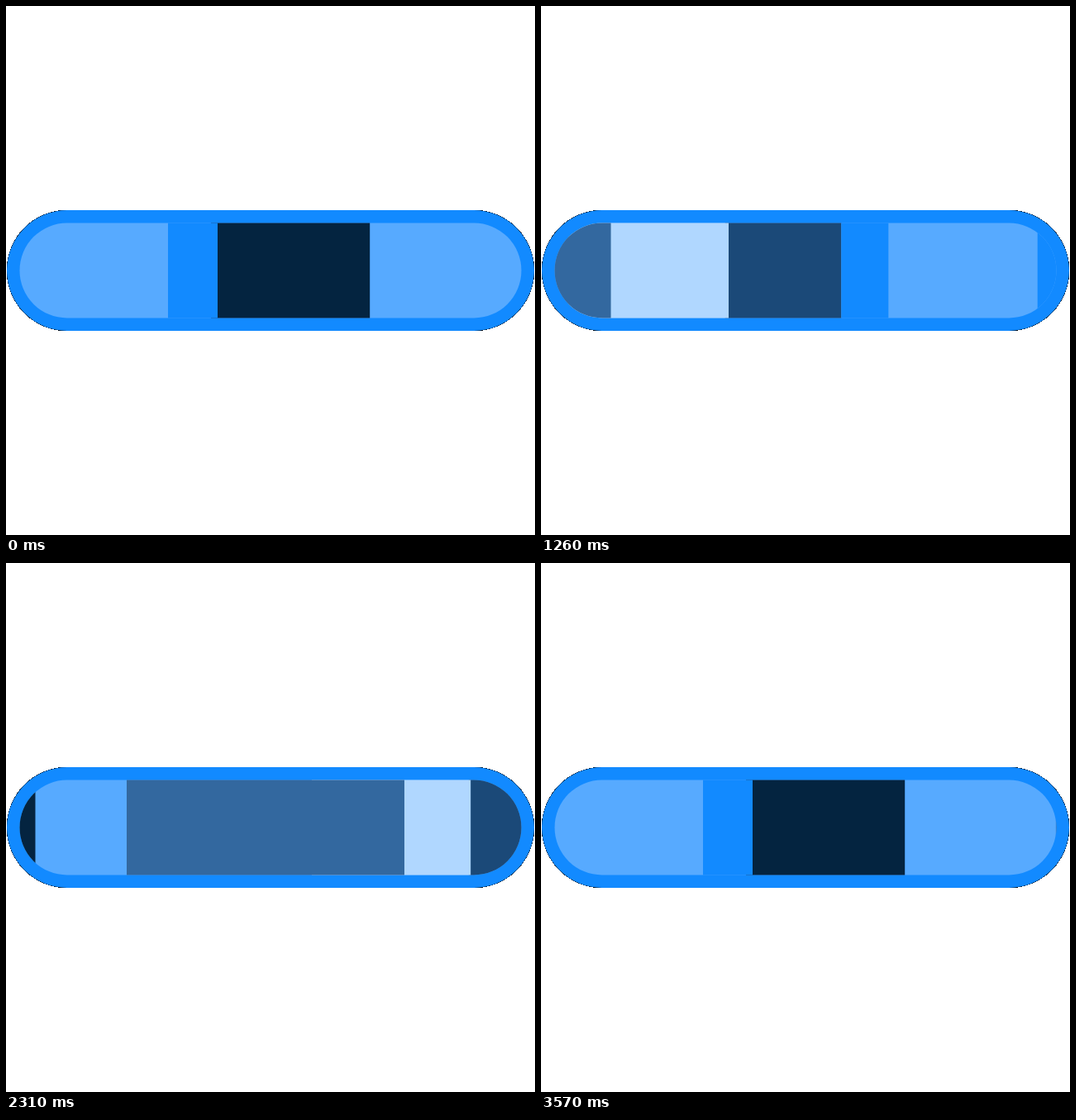
Recreate the animation shown at these times as an HTML page. Size 640 px wide and 640 px high, loop 3600 ms.

```html
<!DOCTYPE html>
<html lang="en">
<head>
<meta charset="utf-8">
<title>Sliding blocks</title>
<style>
  html, body { margin: 0; width: 100%; height: 100%; overflow: hidden; background: #fff; }
  svg { display: block; width: 100vw; height: 100vh; }
</style>
</head>
<body>
<svg viewBox="0 0 640 640">
  <defs>
    <clipPath id="pill"><rect x="16.5" y="262.5" width="607" height="115" rx="57.5"/></clipPath>
  </defs>
  <rect x="0.6" y="246.6" width="638.8" height="146.8" rx="73.4" shape-rendering="crispEdges"/>
  <rect x="1" y="247" width="638" height="146" rx="73" fill="#128aff"/>
  <rect x="16.5" y="262.5" width="607" height="115" rx="57.5" fill="#57aaff"/>
  <g id="blocks"></g>
</svg>
<script>
const LOOP = 3600, STEP = 30;
const SLOW = 0.3212, FAST = 0.3785;
const SPAN = SLOW * (LOOP - STEP);
const BLUE = '#128aff';

// An edge passes x at time t0, moving right at a steady speed.
const edge = (x, t0 = 0, v = SLOW) => t => x + v * (t - t0);

// Later blocks cover earlier ones.
const blocks = [
  ['#042440', edge(248), edge(440.2)],
  [BLUE, edge(196), edge(256)],
  ['#1b4978', edge(-182), edge(-41.4)],
  ['#b0d7ff', edge(-372), edge(227, 1260, 0.3192)],
  [BLUE, edge(-41.4), edge(15.6)],
  ['#33689f', edge(146, 2310, FAST), edge(323, 1890, FAST)]
];

const group = document.getElementById('blocks');

function addBlock([fill, left, right], shift) {
  const holder = document.createElementNS('http://www.w3.org/2000/svg', 'g');
  const rect = document.createElementNS('http://www.w3.org/2000/svg', 'rect');
  holder.setAttribute('clip-path', 'url(#pill)');
  rect.setAttribute('y', 250);
  rect.setAttribute('height', 140);
  rect.setAttribute('fill', fill);
  holder.append(rect);
  group.append(holder);
  return { rect, left, right, shift };
}

const parts = [0, -SPAN].flatMap(shift => blocks.map(b => addBlock(b, shift)));

function draw(ms) {
  const t = Math.floor((ms % LOOP) / STEP) * STEP;
  for (const { rect, left, right, shift } of parts) {
    const a = left(t) + shift, b = right(t) + shift;
    rect.setAttribute('x', a);
    rect.setAttribute('width', Math.max(0, b - a));
  }
}

let start;
function tick(now) {
  start ??= now;
  draw(now - start);
  requestAnimationFrame(tick);
}
draw(0);
requestAnimationFrame(tick);
</script>
</body>
</html>
```
